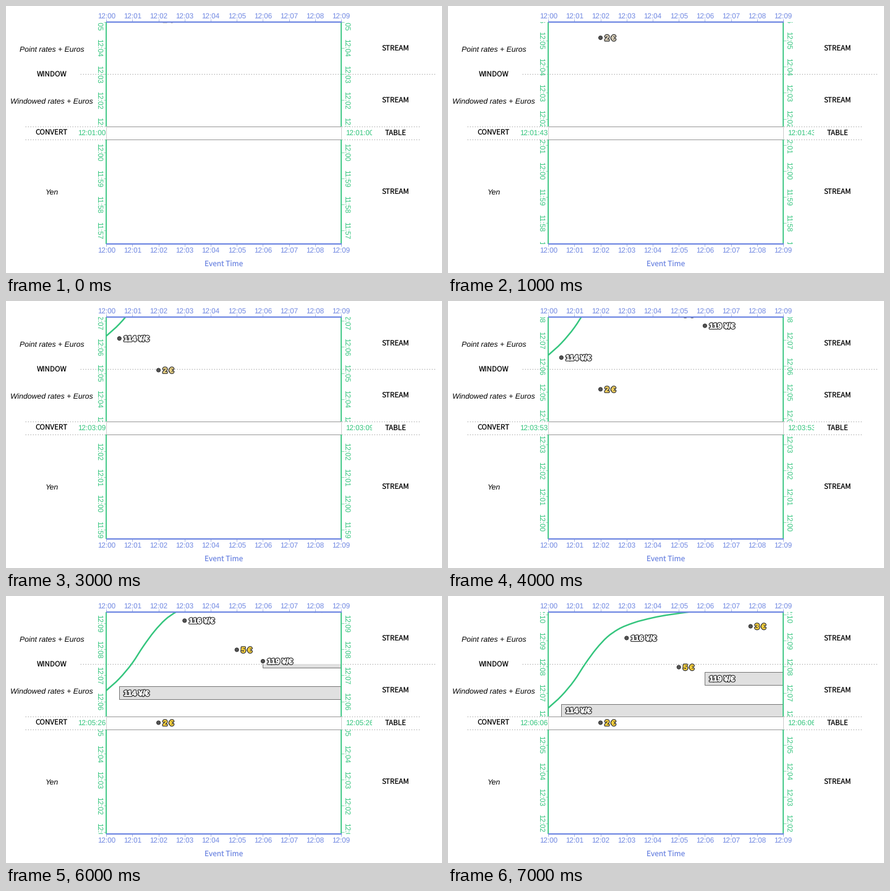
Write a matplotlib script that moves like this. It is 705x432 px and loops after 8000 ms.

```python
import numpy as np
import matplotlib.pyplot as plt
from matplotlib.animation import FuncAnimation
from matplotlib.patches import Circle, PathPatch, Rectangle
from matplotlib.path import Path
from matplotlib.patheffects import Normal, Stroke
from matplotlib.transforms import Bbox, TransformedBbox

W, H = 705, 432
BLUE, GREEN, DARK = "#7088e2", "#33c57d", "#3c3c3c"
SANS, UPRIGHT = "Liberation Sans", "Noto Sans CJK JP"
LEFT, RIGHT, MINUTE = 162.2, 542, 42.2
TOP, WINDOW, TABLE, TABLE_END, BOTTOM = 26, 110.4, 194.6, 215.5, 384.5
TABLE_MID = 205
PANELS = [(TOP, TABLE), (TABLE_END, BOTTOM)]

# Processing clock of each step, in seconds after 12:00
CLOCK = [60, 103, 146, 189, 233, 279, 326, 366]

# (event minute, processing minute, value)
RATES = [(0.5, 6.325, 114), (6, 7.545, 119), (3, 9.1, 116)]
EUROS = [(2, 5.11, 2), (5, 7.983, 5), (7.75, 9.55, 3)]

# Watermark: (event minute, processing minute)
WATERMARK = [(0, 6.42), (0.5, 6.88), (1, 7.48), (1.42, 8.12), (1.84, 8.69),
             (2.26, 9.14), (2.67, 9.43), (3.26, 9.68), (3.97, 9.87),
             (5.4, 10.1), (6.6, 10.24), (9, 10.4)]

plt.rcParams["text.hinting"] = "no_hinting"

# At 72 dpi one point is one pixel
fig = plt.figure(figsize=(W / 72, H / 72), dpi=72, facecolor="white")
ax = fig.add_axes([0, 0, 1, 1])
ax.set_xlim(0, W)
ax.set_ylim(H, 0)
ax.axis("off")
moving = []


def clip(artist, x0, y0, x1, y1):
    box = Bbox.from_extents(x0, y0, x1, y1)
    artist.set_clip_box(TransformedBbox(box, ax.transData))
    artist.set_clip_on(True)
    return artist


def line(xs, ys, color, width=1.0, z=2, **kw):
    return ax.plot(xs, ys, color=color, lw=width, zorder=z,
                   solid_capstyle="butt", dash_capstyle="butt", **kw)[0]


def say(x, y, text, size, color="black", font=SANS, ha="center", **kw):
    """Place text with its capitals centred on y."""
    return ax.text(x, y + 0.36 * size, text, fontsize=size, color=color,
                   family=font, ha=ha, va="baseline", **kw)


def event_x(minute):
    return LEFT + minute * MINUTE


def clock_y(minute, now):
    return TABLE - (minute - now) * MINUTE


def hhmm(minute):
    hours, mins = divmod(720 + minute, 60)
    return f"{hours}:{mins:02d}"


def smooth_path(points):
    """Smooth cubic curve through the points."""
    p = np.array(points)
    slope = np.gradient(p[:, 1], p[:, 0])
    verts = [p[0]]
    for i in range(len(p) - 1):
        dx = (p[i + 1, 0] - p[i, 0]) / 3
        verts += [p[i] + (dx, slope[i] * dx),
                  p[i + 1] - (dx, slope[i + 1] * dx), p[i + 1]]
    return Path(verts, [Path.MOVETO] + [Path.CURVE4] * (len(verts) - 1))


def draw_static():
    dots = dict(linestyle=(0, (1.5, 2.5)))
    line([120, 696], [WINDOW] * 2, "#aaaaaa", **dots)
    for y in (TABLE, TABLE_END):
        line([31, 670], [y, y], "#aaaaaa", **dots)
        line([LEFT, RIGHT], [y, y], "#999999")
    for x in (LEFT, RIGHT):
        line([x, x], [TABLE, TABLE_END], "#cccccc")
        for y0, y1 in PANELS:
            line([x, x], [y0, y1], GREEN, 1.8, z=6)

    for y, tick_end, label_y in ((TOP, 21, 15.5), (BOTTOM, 389, 395)):
        line([LEFT - 0.5, RIGHT + 0.5], [y, y], BLUE, 2.2, z=7)
        for m in range(10):
            x = event_x(m)
            line([x, x], [y, tick_end], "#a3b0e4")
            say(x, label_y, hhmm(m), 11.6, BLUE)
    say(352, 417, "Event Time", 11.9, BLUE, UPRIGHT)

    for y, text in ((69, "Point rates + Euros"), (153, "Windowed rates + Euros"),
                    (300.5, "Yen")):
        say(74, y, text, 12.2, style="italic")
    for x, y, text in ((74, 110.5, "WINDOW"), (74, 205, "CONVERT"), (630, 205, "TABLE"),
                       (630, 68.5, "STREAM"), (630, 153, "STREAM"), (630, 300.5, "STREAM")):
        say(x, y, text, 11.6, font=UPRIGHT)


def add(artist, *box):
    moving.append(clip(artist, *box))


def draw_axis(now):
    sides = ((LEFT, LEFT - 4.5, 150), (RIGHT, RIGHT + 4.5, 550))
    for y0, y1 in PANELS:
        for m in range(-6, 13):
            y = clock_y(m, now)
            if not y0 - 16 < y < y1 + 16:
                continue
            for x, tick_end, label_x in sides:
                add(line([x, tick_end], [y, y], "#8fd9b3"), 0, y0, W, y1)
                label = ax.text(label_x, y, hhmm(m), fontsize=11.6, color=GREEN,
                                family=SANS, rotation=-90, ha="center", va="center")
                add(label, 0, y0, W, y1)


def draw_label(x, y, text, fill):
    effects = [Stroke(linewidth=3.2, foreground=DARK),
               Stroke(linewidth=0.5, foreground=fill), Normal()]
    label = say(x + 7, y, text, 12.6, fill, ha="left", weight="bold", zorder=5,
                path_effects=effects)
    add(label, LEFT, TOP, W, BOTTOM)


def draw_dot(x, y):
    dot = Circle((x, y), 3, fc="#555555", ec="#2e2e2e", lw=1, zorder=5)
    add(ax.add_patch(dot), LEFT, TOP, W, BOTTOM)


def draw_rate(minute, at, value, now):
    x, y = event_x(minute), clock_y(at, now)
    if y + 10.2 > WINDOW:
        bar = Rectangle((x, y - 10.5), RIGHT - x, 20.7, fc="#e0e0e0",
                        ec="#777777", lw=1, zorder=3)
        add(ax.add_patch(bar), LEFT, WINDOW, RIGHT, TABLE + 0.8)
    if y < WINDOW:
        draw_dot(x, y)
    draw_label(x, y, f"{value} ¥/€", "white")


def draw_euro(minute, at, value, now):
    x, y = event_x(minute), min(clock_y(at, now), TABLE_MID)
    draw_dot(x, y)
    tan, gold = np.array([0.86, 0.82, 0.73]), np.array([1.0, 0.83, 0.23])
    mix = np.clip((now - 2.1) / 2.5, 0, 1)
    draw_label(x, y, f"{value} €", tuple(tan + (gold - tan) * mix))


def draw_clock(seconds):
    text = f"12:{seconds // 60:02d}:{seconds % 60:02d}"
    for x, edge in ((116.5, LEFT), (549, 592)):
        add(say(x, TABLE_MID, text, 11.6, GREEN, ha="left"), 0, 0, edge, H)


def update(step):
    while moving:
        moving.pop().remove()
    now = CLOCK[step] / 60
    draw_axis(now)
    draw_clock(CLOCK[step])
    curve = smooth_path([(event_x(m), clock_y(p, now)) for m, p in WATERMARK])
    add(ax.add_patch(PathPatch(curve, fc="none", ec=GREEN, lw=2.4, zorder=4)),
        LEFT, TOP, RIGHT, TABLE)
    for rate in RATES:
        draw_rate(*rate, now)
    for euro in EUROS:
        draw_euro(*euro, now)
    return moving


draw_static()
anim = FuncAnimation(fig, update, frames=len(CLOCK), init_func=lambda: [],
                     interval=1000, repeat=True, repeat_delay=0)
plt.show()
```
